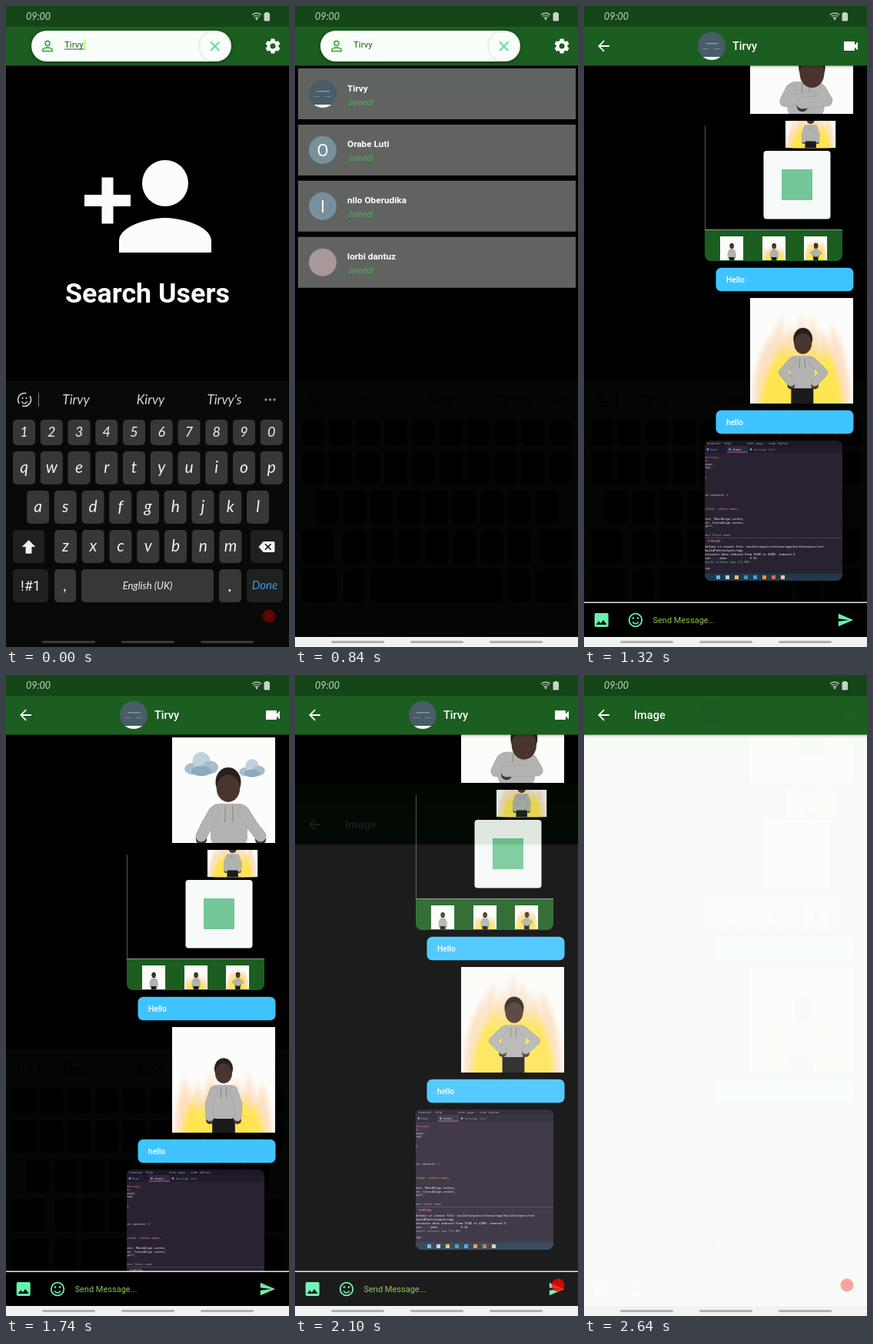
Animation of 368 by 832 pixels, one loop 2700 ms. Source, as an HTML page with a canvas:

```html
<!DOCTYPE html>
<html lang="en">
<head>
<meta charset="utf-8">
<title>Chat app walkthrough</title>
<style>
html, body { margin: 0; height: 100%; overflow: hidden; background: #000; }
canvas { display: block; }
</style>
</head>
<body>
<canvas id="stage" width="368" height="832"></canvas>
<script>
const W = 368, H = 832, LOOP = 2700, STEP = 60, TAU = Math.PI * 2;
const GREEN = '#1b5e20', MINT = '#69f0ae', SCRIPT = 'Lato, sans-serif';
const NAME = 'Tirvy';
const screen = document.getElementById('stage').getContext('2d');
const layer = Object.assign(document.createElement('canvas'), { width: W, height: H }).getContext('2d');
let g = screen;

const ICONS = {
  addUser: 'M15 12a4 4 0 100-8 4 4 0 000 8zM6 10V7H4v3H1v2h3v3h2v-3h3v-2zM15 14c-2.67 0-8 1.34-8 4v2h16v-2c0-2.66-5.33-4-8-4z',
  video: 'M17 10.5V7c0-.55-.45-1-1-1H4c-.55 0-1 .45-1 1v10c0 .55.45 1 1 1h12c.55 0 1-.45 1-1v-3.5l4 4v-11z',
  back: 'M20 11H7.83l5.59-5.59L12 4l-8 8 8 8 1.41-1.41L7.83 13H20z',
  image: 'M21 19V5a2 2 0 00-2-2H5a2 2 0 00-2 2v14a2 2 0 002 2h14a2 2 0 002-2zM8.5 13.5l2.5 3 3.5-4.5 4.5 6H5z',
  send: 'M2 21L23 12 2 3v7l15 2-15 2z',
  shift: 'M12 3L3 12h5v9h8v-9h5z',
  erase: 'M22 4H7L0 12l7 8h15a2 2 0 002-2V6a2 2 0 00-2-2zM19 15.6L17.6 17 14 13.4 10.4 17 9 15.6 12.6 12 9 8.4 10.4 7 14 10.6 17.6 7 19 8.4 15.4 12z'
};

const clamp = v => Math.min(1, Math.max(0, v));
const span = (t, from, to) => clamp((t - from) / (to - from));
const smooth = k => k * k * (3 - 2 * k);
const mix = (a, b, k) => a.map((v, i) => v + (b[i] - v) * k);

function rect(x, y, w, h, color, r = 0) {
  g.fillStyle = color;
  g.beginPath();
  g.roundRect(x, y, w, h, r);
  g.fill();
}
function disc(x, y, r, color, ry = r) {
  g.fillStyle = color;
  g.beginPath();
  g.ellipse(x, y, r, ry, 0, 0, TAU);
  g.fill();
}
function arc(x, y, r, color, width, from = 0, to = TAU) {
  g.strokeStyle = color;
  g.lineWidth = width;
  g.beginPath();
  g.arc(x, y, r, from, to);
  g.stroke();
}
function line(color, width, ...points) {
  g.strokeStyle = color;
  g.lineWidth = width;
  g.beginPath();
  points.forEach(p => g.lineTo(...p));
  g.stroke();
}
function text(str, x, y, font, color, align = 'left') {
  g.font = font;
  g.fillStyle = color;
  g.textAlign = align;
  g.fillText(str, x, y);
}
const roboto = (size, weight = 400) => `${weight} ${size}px Roboto, sans-serif`;
const script = size => `italic ${size}px ${SCRIPT}`;

function at(x, y, scale, draw) {
  g.save();
  g.translate(x, y);
  g.scale(scale, scale);
  draw();
  g.restore();
}
function clipped(x, y, w, h, r, draw) {
  g.save();
  g.beginPath();
  g.roundRect(x, y, w, h, r);
  g.clip();
  draw();
  g.restore();
}
function icon(name, x, y, scale, color) {
  at(x, y, scale, () => {
    g.translate(-12, -12);
    g.fillStyle = color;
    g.fill(new Path2D(ICONS[name]), 'evenodd');
  });
}

function appBar() {
  g.save();
  g.shadowColor = 'rgba(0,0,0,.4)';
  g.shadowBlur = 4;
  g.shadowOffsetY = 1;
  rect(0, 0, W, 77.4, GREEN);
  g.restore();
  rect(0, 0, W, 27, '#144618');
}
function systemBars(light) {
  text('09:00', 26, 18, script(12.5), '#c8d4c9');
  [3.2, 6, 8.8].forEach(r => arc(326, 18, r, '#c8d4c9', 1.2, -2.3, -.84));
  disc(326, 17, 1.2, '#c8d4c9');
  rect(335.5, 9, 7.5, 10.5, '#c8d4c9', 1);
  rect(337.5, 8, 3.5, 2, '#c8d4c9');
  if (light) rect(0, 819, W, 13, '#f1f3f0');
  for (const x of [47, 150, 253]) rect(x, 824, 69, 3, light ? '#b0b2b0' : '#3a3c3a', 1.5);
}
function photoAvatar(x, y) {
  clipped(x - 18, y - 18, 36, 36, 18, () => {
    rect(x - 18, y - 18, 36, 36, '#485d68');
    rect(x - 18, y + 14, 36, 4, '#f4f6f5');
    rect(x - 8, y - 4, 17, 1.5, '#8496a0');
    rect(x - 12, y + 3, 8, 1, '#728690');
    rect(x + 3, y + 3, 8, 1, '#728690');
  });
}

function keyboard(ghost) {
  rect(0, 486, W, H - 486, ghost ? '#040603' : '#070a06');
  const ink = ghost ? '#000' : '#f0f2f0';
  const key = (x, y, w, h, label, size = 20, special = false, color = ink) => {
    rect(x, y, w, h, ghost ? '#000' : special ? '#1e211e' : '#363836', 5);
    if (!ghost) text(label, x + w / 2, y + h / 2 + size * .32, script(size), color, 'center');
  };
  const row = (chars, x, y, h, size) =>
    [...chars].forEach((c, i) => key(x + i * 35.75, y, 29, h, c, size));

  const soft = ghost ? '#000' : '#d4d8d4';
  arc(24, 511, 8.5, soft, 1.6, -.6, 1.9);
  arc(24, 511, 8.5, soft, 1.6, 2.5, 5);
  arc(24, 512, 3.8, soft, 1.3, .3, 2.84);
  disc(21.5, 509, 1.1, soft);
  disc(26.5, 509, 1.1, soft);
  rect(42, 502, 1, 18, ghost ? '#000' : '#777');
  text(NAME, 91, 517, script(17), soft, 'center');
  text('Kirvy', 188, 517, script(17), soft, 'center');
  text(NAME + "'s", 284, 517, script(17), soft, 'center');
  for (const x of [338, 343.5, 349]) disc(x, 511, 1.7, ghost ? '#000' : '#8a8c8a');

  row('1234567890', 9, 537, 33, 18);
  row('qwertyuiop', 9, 578, 43, 21);
  row('asdfghjkl', 27, 629, 43, 21);
  row('zxcvbnm', 63, 680, 43, 21);
  key(9, 680, 41, 43, '', 20, true);
  key(318, 680, 42, 43, '', 20, true);
  key(9, 731, 46, 43, '', 20, true);
  key(63, 731, 28, 43, ',');
  key(98, 731, 172, 43, 'English (UK)', 13);
  key(277, 731, 29, 43, '.', 24);
  key(313, 731, 47, 43, 'Done', 15, true, '#4695e6');
  if (ghost) return;
  icon('shift', 29.5, 702, .98, ink);
  icon('erase', 339, 702, .87, ink);
  text('!#1', 32, 759, roboto(18), ink, 'center');
}

function searchBar(typing) {
  appBar();
  g.save();
  g.shadowColor = 'rgba(0,0,0,.45)';
  g.shadowBlur = 4;
  g.shadowOffsetY = 1;
  rect(33, 32, 260, 40, '#fafefa', 20);
  g.restore();
  arc(54, 48.5, 3, '#4caf50', 1.8);
  g.strokeStyle = '#4caf50';
  g.stroke(new Path2D('M47.8 58.6v-1.6c0-2 4.1-3 6.2-3s6.2 1 6.2 3v1.6z'));
  text(NAME, 76, 54, roboto(11.5), GREEN);
  if (typing) {
    rect(76, 55.5, 26, 1, GREEN);
    rect(101.5, 43, 2, 14, '#b2ff59');
  }
  arc(271.5, 52, 20.5, 'rgba(0,40,0,.07)', 2);
  line('#5fe3a4', 2.2, [266, 46.5], [277.5, 58]);
  line('#5fe3a4', 2.2, [277.5, 46.5], [266, 58]);
  arc(347, 52, 5.5, '#fff', 4);
  for (let i = 0; i < 6; i++) at(347, 52, 1, () => {
    g.rotate(i * TAU / 6);
    rect(-2.6, -9.5, 5.2, 4, '#fff', .8);
  });
}

function userList() {
  const users = [NAME, 'Orabe Luti', 'nilo Oberudika', 'lorbi dantuz'];
  users.forEach((name, i) => {
    const y = 81 + i * 72.9;
    rect(4, y, 361, 66, '#616361');
    text(name, 68, y + 29.5, roboto(11.8, 700), '#fff');
    text('Joined!', 68, y + 47.5, roboto(10.4), '#4caf50');
    if (i === 0) return photoAvatar(36, y + 33);
    disc(36, y + 33, 18, i === 3 ? '#a8989a' : '#78909c');
    if (i < 3) text('OI'[i - 1], 36, y + 41, roboto(22), '#fff', 'center');
  });
}

function searchPage(t) {
  rect(0, 0, W, H, '#000');
  const typing = t < 240;
  if (typing) {
    icon('addUser', 184.5, 260, 7.5, '#fbfdfb');
    text('Search Users', 184, 385, roboto(35.8, 700), '#fff', 'center');
  }
  keyboard(true);
  if (t >= 540) userList();
  else if (!typing) arc(184, 455, 16, '#4caf50', 3.5, t / 90, t / 90 + 4);
  searchBar(typing);
  const drop = 346 * smooth(span(t, 180, 360));
  if (drop < 346) at(0, drop, 1, () => keyboard(false));
}

// Soft tongues of fire that narrow towards the middle as they grow.
function flames(k) {
  const top = 56 - 50 * k;
  g.save();
  g.filter = `blur(${3 * g.getTransform().a}px)`;
  for (const [tint, lift, inset] of [['#fde0c2', 0, 0], ['#ffe552', 24, 10]]) {
    const fade = g.createLinearGradient(0, top + lift, 0, 137);
    fade.addColorStop(0, 'rgba(253,216,182,.5)');
    fade.addColorStop(.45, tint);
    fade.addColorStop(1, tint);
    g.fillStyle = fade;
    for (let i = 0; i < 7; i++) {
      const side = i / 3 - 1;
      const x = 67 + side * (50 - inset);
      const tip = top + lift + 8 * (1 + Math.sin(i * 2.4 + k * 3)) + 22 * k * side * side;
      g.beginPath();
      g.moveTo(x - 13, 140);
      g.quadraticCurveTo(x - 15, tip + 40, x - side * 14 * k, tip);
      g.quadraticCurveTo(x + 13, tip + 40, x + 13, 140);
      g.fill();
    }
  }
  g.restore();
}

// Pose: head x, y, radius; torso x, top, half width, bottom; left elbow, hand; right elbow, hand.
function figure([hx, hy, hr, tx, top, half, bottom, ...arms]) {
  const skin = '#49352e', cloth = '#b3b4b2', sleeve = half * .58;
  rect(tx - half * .9, bottom - 6, half * 1.8, 40, '#1b1b1c');
  rect(tx - half, top, half * 2, bottom - top, cloth, half * .4);
  line('#777', .8, [tx - half * .2, top + 3], [tx - half * .22, top + half]);
  line('#777', .8, [tx + half * .2, top + 3], [tx + half * .22, top + half]);
  g.lineCap = g.lineJoin = 'round';
  for (const side of [0, 1]) {
    const [ex, ey, x, y] = arms.slice(side * 4);
    const shoulder = [tx + (side ? 1 : -1) * half * .78, top + half * .42];
    disc(x, y + 2, sleeve * .52, skin);
    line('#999a98', sleeve + 1, shoulder, [ex, ey], [x, y - 2]);
    line(cloth, sleeve, shoulder, [ex, ey], [x, y - 2]);
  }
  g.lineCap = 'butt';
  disc(hx, hy - hr * .25, hr, '#25211c', hr * 1.15);
  disc(hx, hy + hr * .25, hr * .92, skin, hr * 1.08);
}
const RELAXED = [67, 57, 12, 67, 75, 16.5, 119, 48, 100, 49, 119, 86, 100, 85, 119];
const ON_HIPS = [69, 56, 12.5, 68, 75, 16, 117, 41, 96, 54, 110, 98, 96, 84, 110];
const OPEN_ARMS = [73, 62, 16.5, 74, 86, 24, 140, 45, 114, 38, 130, 104, 114, 115, 130];
const CROSSED = [82, 84, 17.5, 72, 97, 24, 140, 46, 122, 86, 115, 99, 121, 58, 124];

function sticker(x, y, scale, pose, fire) {
  at(x, y, scale, () => clipped(0, 0, 134, 137, 0, () => {
    rect(0, 0, 134, 137, '#fcfdfb');
    if (fire !== undefined) flames(fire);
    figure(pose);
  }));
}
function clouds(alpha) {
  g.globalAlpha = alpha;
  for (const [x, y, s] of [[38, 36, .95], [104, 41, .72]]) at(x, y, s, () => {
    disc(-12, 5, 11, '#a9bfd0', 8);
    disc(0, -6, 12, '#c0d1dd');
    disc(12, 3, 11, '#a5bccd', 9);
    disc(0, 8, 14, '#8ea8bc', 7);
  });
  g.globalAlpha = 1;
}

function appShot() {
  rect(157, 149, 179, 182, '#000');
  rect(157, 155, 1, 136, '#555');
  sticker(262, 117.5, .488, RELAXED, .5);
  rect(233.5, 188, 87, 88.5, '#f6faf8', 4);
  rect(257, 212, 40, 40, '#74c796');
  rect(157, 291, 179, 40, GREEN);
  rect(157, 290, 179, 1, '#8a948a');
  sticker(177, 299, .226, RELAXED);
  sticker(232, 299, .226, RELAXED, .2);
  sticker(286, 299, .226, ON_HIPS, 1);
}
function codeShot() {
  rect(157, 564, 179, 182, '#292233');
  rect(157, 564, 179, 7, '#1c1826');
  rect(157, 571, 179, 9, '#211b2b');
  rect(186, 571, 27, 9, '#30283c');
  rect(186, 578.5, 27, 1, '#b05a86');
  const mono = (str, x, y, color) => text(str, x, y, '500 3.9px "Noto Sans Mono", monospace', color);
  mono('Terminal  Help', 159, 569, '#a9a3b0');
  mono('chat page - code editor', 212, 569, '#a9a3b0');
  mono('home', 164, 577, '#8f8998');
  mono('chats', 193, 577, '#e6e2ea');
  mono('message list', 221, 577, '#8f8998');
  for (const x of [161, 189.5, 217]) disc(x, 575.5, 1.4, '#4aa8e0');
  const code = [[587, '#ef6b73', 'message;'], [591, '#ccc', 's;'], [596, '#ccc', 'page;'],
    [600, '#ccc', 'age,'], [613, '#ddd', '}'], [636, '#ddd', 'nt content) {'], [654, '#e0a36a', 'color: colors.main,'],
    [667, '#fff2ec', 'ent: MainAlign.center,'], [672, '#fff2ec', 'nt: CrossAlign.center,'], [676, '#ccc', 'get);'],
    [688, '#aaa', 'ber false name'], [703, '#fff', 'before it create file: build/outputs/release/app/build/outputs/rel'],
    [708, '#fff', 'buildPath/outputs/app'], [713, '#fff', 'resource data reduced from 9100 to 4200: removed 5'],
    [718, '#fff', 'run ... done             9.8s'], [723, '#5ecf87', 'built release app (12 MB).'], [731, '#ccc', 'age']];
  code.forEach(([y, color, str]) => mono(str, 157.5, y, color));
  rect(157, 690, 179, .7, '#51485c');
  mono('TERMINAL', 160, 696, '#e68b86');
  rect(157, 736.5, 179, 9.5, '#23384a');
  ['#5fb4e8', '#c8d0d6', '#e8c45c', '#3f91d0', '#3da4e4', '#e79545', '#d9685c', '#d9d2a8']
    .forEach((c, i) => rect(172 + i * 12, 739, 5, 5, c));
}
function bubble(str, y) {
  rect(171.5, y - .2, 179, 30.4, '#40c4ff', 7);
  text(str, 185, y + 18.5, roboto(10.2, 500), '#fff');
}

function chatPage(t) {
  const pose = .5 - .5 * Math.cos((t - 1080) / 660 * TAU);
  const scroll = 78 * smooth(span(t, 1440, 1620)) * (1 - smooth(span(t, 1800, 1980)));
  const loading = .33 * (1 - span(t, 1120, 1260));
  rect(0, 0, W, H, '#000');
  if (t < 2040) keyboard(true);
  clipped(0, 77, W, 697, 0, () => {
    g.translate(0, scroll);
    sticker(216, 3, 1, mix(OPEN_ARMS, CROSSED, pose));
    at(216, 3, 1, () => clouds(1 - pose));
    for (const [draw, y] of [[appShot, 149], [codeShot, 564]]) clipped(157, y, 179, 182, 8, () => {
      draw();
      if (!loading) return;
      rect(157, y, 179, 182, `rgba(250,255,245,${loading})`);
      arc(247, y + 91, 27, `rgba(65,150,125,${loading * 1.8})`, 3, t / 300 - 2, t / 300 + 1.6);
    });
    bubble('Hello', 340);
    sticker(216, 379, 1, mix(RELAXED, ON_HIPS, pose), pose);
    bubble('hello', 525);
  });
  rect(0, 774, W, 46, '#000');
  rect(0, 773.5, W, 1.5, '#e4e6e4');
  icon('image', 22.7, 797, 1, MINT);
  arc(67, 797, 8.3, MINT, 1.8);
  arc(67, 797.8, 4, MINT, 1.5, .4, 2.74);
  disc(64, 794.5, 1.3, MINT);
  disc(70, 794.5, 1.3, MINT);
  text('Send Message...', 89.5, 801, roboto(11), '#8bc34a');
  icon('send', 340, 797, .92, MINT);
  appBar();
  icon('back', 25.5, 52, .93, '#fff');
  photoAvatar(166, 52);
  text(NAME, 193, 57, roboto(14.6, 500), '#fff');
  icon('video', 347, 52, 1, '#fff');
}

function imagePage() {
  rect(0, 0, W, H, '#fcfefb');
  appBar();
  icon('back', 25.5, 52, .93, '#fff');
  text('Image', 65, 57, roboto(14.6, 500), '#fff');
}

// Fades a page in while it rises a quarter of the screen height.
function pushPage(draw, t, progress, maxAlpha = 1) {
  if (progress <= 0) return;
  g = layer;
  draw(t);
  g = screen;
  g.globalAlpha = Math.min(maxAlpha, progress ** 2.25);
  g.drawImage(layer.canvas, 0, H / 4 * (1 - smooth(progress)));
  g.globalAlpha = 1;
}

function render() {
  const t = Math.floor(performance.now() % LOOP / STEP) * STEP;
  const chat = span(t, 900, 1060), image = span(t, 2040, 2200);
  if (chat < 1) searchPage(t);
  pushPage(chatPage, t, chat);
  pushPage(imagePage, t, image, .99);
  systemBars(t >= 300);
  const blink = .5 + .5 * Math.cos((t - 1080) / 480 * TAU);
  disc(342, 792, 8.5, `rgba(255,0,0,${blink ** 1.5})`);
  requestAnimationFrame(render);
}
render();
</script>
</body>
</html>
```
